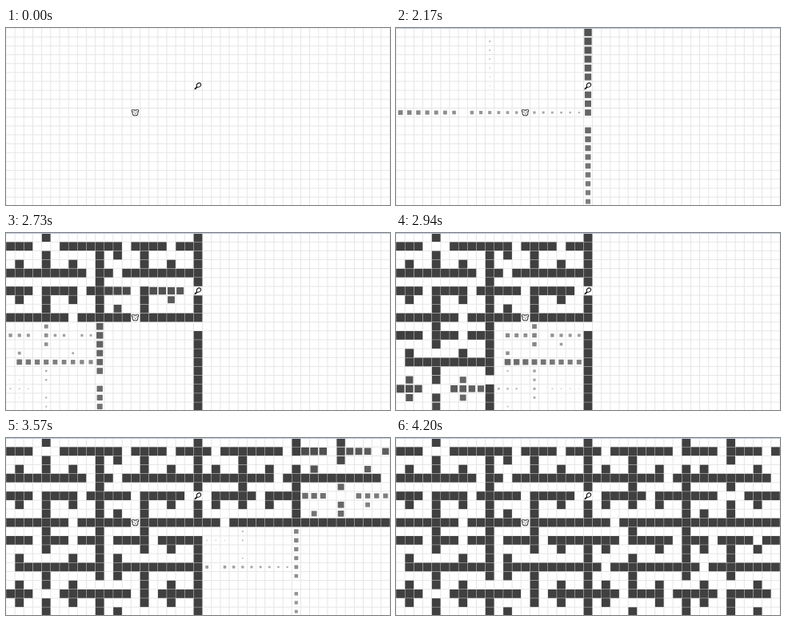
These frames come from a looping animation (480x222 px, 6020 ms). An HTML page with a canvas:

```html
<!DOCTYPE html>
<html>
<head>
<meta charset="utf-8">
<style>
html, body { margin: 0; width: 100%; height: 100%; overflow: hidden; background: #fff; }
canvas { display: block; }
</style>
</head>
<body>
<canvas id="stage" width="480" height="222"></canvas>
<script>
const ctx = document.getElementById('stage').getContext('2d');
const LOOP = 6020, TICK = 70;
const COLS = 43, ROWS = 20, PITCH = 480 / COLS;
const START = 1925, STAGGER = 5.24, GROW = 280;

// Offset of the opening in each dividing wall, in the order the walls are built
const gaps = [
  10,
  7, 0, 9, 1, 3, 0, 0, 0, 0, 3, 1, 3, 1,
  1, 0, 2, 1, 2, 0, 0, 3, 0, 4, 1,
  6, 0, 3, 3, 0, 2, 0, 2, 3, 0, 1, 0, 0, 1,
  0, 3, 0, 0, 0, 1, 4, 3, 1, 0, 0, 0, 1,
  2, 2, 8, 0, 1, 0, 4, 0, 3, 0, 1, 1, 1,
  9, 3, 3, 0, 3, 0, 1, 3, 0, 0, 1,
  6, 1, 2, 3, 1, 4, 1, 3, 3, 0, 1, 3, 0, 1,
  1, 0, 2, 1, 2, 1, 1, 3, 0, 1, 4, 0, 0
];
const walls = [];
let built = 0;

function addWall(x, y) {
  const taken = (x === 14 && y === 9) || (x === 21 && y === 6);
  if (!taken) walls.push([x, y]);
}

// Recursive division: halve the chamber, alternating direction
function divide(x0, x1, y0, y1, vertical) {
  if (x1 - x0 < 3 || y1 <= y0) return;
  const gap = gaps[built++];
  if (vertical) {
    const x = (x0 + x1) >> 1;
    for (let y = y0; y <= y1; y++) if (y !== y0 + gap) addWall(x, y);
    divide(x0, x - 1, y0, y1, false);
    divide(x + 1, x1, y0, y1, false);
  } else {
    const y = (y0 + y1) >> 1;
    for (let x = x0; x <= x1; x++) if (x !== x0 + gap) addWall(x, y);
    divide(x0, x1, y0, y - 1, true);
    divide(x0, x1, y + 1, y1, true);
  }
}
divide(0, COLS - 1, 0, ROWS - 1, true);

function drawGrid() {
  ctx.fillStyle = '#fff';
  ctx.fillRect(0, 0, 480, 222);
  ctx.fillStyle = '#e6e6e6';
  for (let i = 0; i <= COLS; i++) ctx.fillRect(i * PITCH - 0.5, 0, 1, 222);
  for (let i = 0; i <= ROWS; i++) ctx.fillRect(0, i * PITCH - 0.5, 480, 1);
}

function drawWalls(t) {
  walls.forEach(([x, y], i) => {
    const k = Math.min(1, (t - START - i * STAGGER) / GROW);
    if (k <= 0) return;
    const size = (PITCH - 0.4) * k;
    const shade = Math.round(205 - 141 * k);
    ctx.fillStyle = `rgb(${shade},${shade},${shade})`;
    ctx.fillRect((x + 0.5) * PITCH - size / 2, (y + 0.5) * PITCH - size / 2, size, size);
  });
}

function disc(x, y, r, fill) {
  ctx.beginPath();
  ctx.arc(x, y, r, 0, Math.PI * 2);
  ctx.fillStyle = fill;
  ctx.fill();
}

function drawMouse() {
  const x = 161.5, y = 106;
  const parts = [[-2.7, -2.3, 1.5], [2.7, -2.3, 1.5], [0, 0.4, 3.4]];
  for (const [dx, dy, r] of parts) disc(x + dx, y + dy, r + 0.5, '#222');
  for (const [dx, dy, r] of parts) disc(x + dx, y + dy, r - 0.4, '#fff');
  disc(x - 1.3, y - 0.4, 0.5, '#222');
  disc(x + 1.3, y - 0.4, 0.5, '#222');
  disc(x, y + 1.6, 0.6, '#222');
}

function drawDrumstick() {
  ctx.beginPath();
  ctx.moveTo(236.9, 75.8);
  ctx.lineTo(238.4, 73.4);
  ctx.bezierCurveTo(237.6, 69.5, 241, 68.2, 243, 69.3);
  ctx.bezierCurveTo(245, 71.5, 242.6, 74.6, 239.3, 74.2);
  ctx.closePath();
  ctx.fillStyle = '#fff';
  ctx.fill();
  ctx.strokeStyle = '#111';
  ctx.lineWidth = 1.1;
  ctx.stroke();
  disc(236.7, 76, 1.1, '#111');
}

function frame(now) {
  const t = Math.floor((now % LOOP) / TICK) * TICK;
  drawGrid();
  drawWalls(t);
  drawMouse();
  drawDrumstick();
  if (t >= 1610) {
    ctx.fillStyle = '#bccbe0';
    ctx.fillRect(0, 0, t < 1680 ? 66 : 480, 1);
  }
}

const begin = performance.now();
function loop() {
  frame(performance.now() - begin);
  requestAnimationFrame(loop);
}
loop();
</script>
</body>
</html>
```
